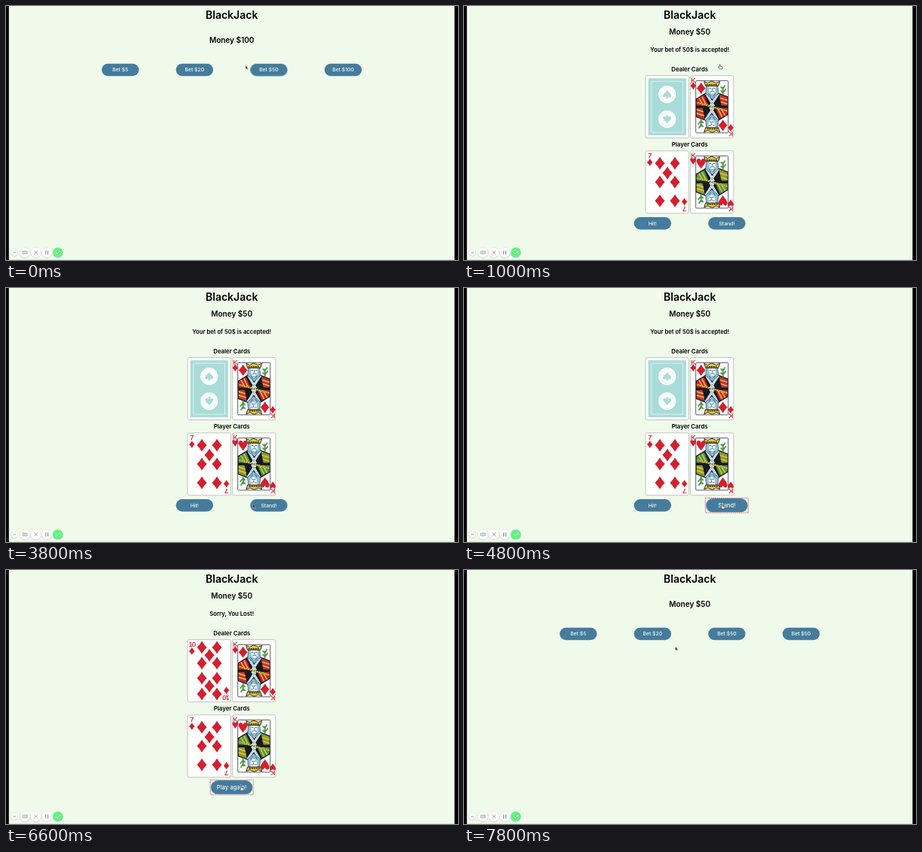
These frames come from a looping animation (600 by 338 pixels, 8 s). An HTML page:

```html
<!DOCTYPE html>
<html lang="en">
<head>
<meta charset="utf-8">
<title>BlackJack</title>
<style>
  html, body { margin: 0; width: 100%; height: 100%; overflow: hidden; background: #f0faeb; }
  svg { display: block; width: 100vw; height: 100vh; }
  text { font-family: Inter, "Open Sans", sans-serif; font-weight: 600; text-anchor: middle; }
  .rank { font: 9.4px "Liberation Sans", sans-serif; fill: #d3202f; stroke: #d3202f; stroke-width: .25; }
  .label { font-size: 6.8px; font-weight: 500; fill: #f0faeb; }

  /* A slight lead keeps every hard cut on the early side of its tick. */
  .anim { animation: 8s step-end -20ms infinite; }
  .start { animation-name: start; }
  .table { animation-name: table; }
  .play { animation-name: play; }
  .over { animation-name: over; }
  .end { animation-name: end; }
  .bar { animation-name: bar; }
  .cursor { animation-name: move; }
  .arrow { animation-name: arrow; }
  .hand { animation-name: hand; }
  .btn { transform-box: fill-box; transform-origin: center; }
  .ring { opacity: 0; }
  .bet50 { animation-name: bet50; }
  .bet50 .ring { animation-name: bet50ring; }
  .stand { animation-name: stand; }
  .stand .ring { animation-name: standring; }
  .again { animation-name: again; }
  .again .ring { animation-name: againring; }

  @keyframes start { 0% { opacity: 1 } 12.5%, 100% { opacity: 0 } }
  @keyframes table { 0%, 87.5%, 100% { opacity: 0 } 12.5% { opacity: 1 } }
  @keyframes play { 0%, 62.5%, 100% { opacity: 0 } 12.5% { opacity: 1 } }
  @keyframes over { 0%, 87.5%, 100% { opacity: 0 } 62.5% { opacity: 1 } }
  @keyframes end { 0%, 100% { opacity: 0 } 87.5% { opacity: 1 } }
  @keyframes bar { 0%, 77.5%, 100% { opacity: 1 } 62.5% { opacity: 0 } }
  @keyframes bet50 { 0%, 12.5%, 100% { transform: none } 5% { transform: scale(1.12) } }
  @keyframes bet50ring { 0%, 12.5%, 100% { opacity: 0 } 10% { opacity: 1 } }
  @keyframes stand { 0%, 62.5%, 100% { transform: none } 50% { transform: scale(1.12) } }
  @keyframes standring { 0%, 62.5%, 100% { opacity: 0 } 60% { opacity: 1 } }
  @keyframes again { 0%, 87.5%, 100% { transform: none } 80% { transform: scale(1.12) } }
  @keyframes againring { 0%, 87.5%, 100% { opacity: 0 } 82.5% { opacity: 1 } }
  @keyframes arrow {
    0%, 17.5%, 77.5%, 90%, 100% { opacity: 1 }
    5%, 50%, 80% { opacity: 0 }
  }
  @keyframes hand {
    0%, 17.5%, 62.5%, 90%, 100% { opacity: 0 }
    5%, 50%, 80% { opacity: 1 }
  }
  @keyframes move {
    0%, 100% { transform: translate(318px, 79px) }
    2.5% { transform: translate(321px, 80px) }
    5% { transform: translate(331px, 81px) }
    7.5% { transform: translate(338px, 79px) }
    10% { transform: translate(339px, 78px) }
    17.5% { transform: translate(338px, 96px) }
    20% { transform: translate(320px, 165px) }
    22.5% { transform: translate(292px, 248px) }
    25% { transform: translate(279px, 288px) }
    27.5% { transform: translate(280px, 288px) }
    47.5% { transform: translate(328px, 287.5px) }
    50% { transform: translate(337px, 288px) }
    52.5% { transform: translate(342px, 288px) }
    77.5% { transform: translate(338px, 291px) }
    80% { transform: translate(320px, 288px) }
    82.5% { transform: translate(311.5px, 287.5px) }
    90% { transform: translate(308px, 262px) }
    92.5% { transform: translate(294px, 170px) }
    95% { transform: translate(283px, 112px) }
    97.5% { transform: translate(280.5px, 102px) }
  }
</style>
</head>
<body>
<svg id="stage" viewBox="0 0 600 338" preserveAspectRatio="none">
  <defs>
    <path id="diamond" fill="#d3202f" d="M0-8.5Q2.6-3.8 6.6 0Q2.6 3.8 0 8.5Q-2.6 3.8-6.6 0Q-2.6-3.8 0-8.5z"/>
    <path id="heart" fill="#d3202f" d="M0 8C-2 3.5-6.6 1-6.6-3.6C-6.6-8.4-1-8.6 0-4C1-8.6 6.6-8.4 6.6-3.6C6.6 1 2 3.5 0 8z"/>
    <path id="spade" fill="#a9dcd8" d="M0-6.5C1-3.5 6-1.5 6 2C6 4.8 2.5 5 1 3L2 6H-2L-1 3C-2.5 5-6 4.8-6 2C-6-1.5-1-3.5 0-6.5z"/>
  </defs>
</svg>
<script>
  const text = (s, y, size, x = 299.7) => `<text x="${x}" y="${y}" font-size="${size}">${s}</text>`;
  const layer = (name, ...parts) => `<g class="anim ${name}">${parts.join('')}</g>`;
  const pip = (suit, x, y, k = 1) => `<use href="#${suit}" transform="translate(${x} ${y}) scale(${k})"/>`;
  const flip = (s, cx, cy) => s + `<g transform="rotate(180 ${cx} ${cy})">${s}</g>`;

  const button = (s, x, y, name = '') => `<g transform="translate(${x} ${y})"><g class="btn anim ${name}">
    <rect width="49.4" height="16.4" rx="8.2" fill="#457b9d"/>
    <rect class="ring anim" x="-.8" y="-.5" width="51" height="17.4" fill="none" stroke="#c2456b" stroke-width=".7" stroke-dasharray="1.5 .8"/>
    <text class="label" x="24.7" y="10.6">${s}</text></g></g>`;

  const card = (x, y, art) => `<g transform="translate(${x} ${y})">
    <rect width="57.3" height="83" rx="2.2" fill="#fff" stroke="#a9b0a8" stroke-width=".7"/>${art}</g>`;

  const corners = (rank, suit, x, y) => flip(
    `<text class="rank" x="${x}" y="8.9"${rank.length > 1 ? ' letter-spacing="-1"' : ''}>${rank}</text>` +
    pip(suit, x, y, .58), 28.7, 41.5);

  const number = (rank, spots) => corners(rank, 'diamond', 5.8, 15.3) +
    spots.map(([x, y]) => pip('diamond', x, y)).join('');

  const pairs = rows => rows.flatMap(y => [[19, y], [39, y]]);
  const seven = number('7', [...pairs([16.5, 41.5, 66.5]), [29, 29.5]]);
  const ten = number('10', [...pairs([10.5, 31.5, 51.5, 72.5]), [29, 21], [29, 62]]);

  const king = (suit, left, right) => {
    const half = `<path d="M0 35V24L13 16H30L43 21V35z" fill="#151a20"/>
      <path d="M1 33V25L11 19L17 33z" fill="${left}"/>
      <path d="M31 18L42 22V33H34z" fill="${right}"/>
      <path d="M4 23L10 33M8 21L14 33M32 23L42 26M33 28L42 31" stroke="#e3c93a" stroke-width="1.5"/>
      <path d="M14 17L24 34M30 17L19 34" stroke="#fff" stroke-width="3"/>
      <path d="M14 17L24 34M30 17L19 34" stroke="#3f8fb5" stroke-width="1.2" stroke-dasharray="1 1"/>
      <path d="M36 19V8M33 13L36 16L40 11M33 8L36 11L39 6" fill="none" stroke="#4f9548" stroke-width="1.8"/>
      <path d="M14 7H29L30 17Q26 20 22 25Q17 20 13 17z" fill="#8fc0d8" stroke="#182530" stroke-width=".6"/>
      <path d="M17 7H26V15Q22 20 18 15z" fill="#f5faf9"/>
      <path d="M18 10H20.5M23 10H25.5M22 10V13M19 15Q22 13 25 15M17 17L20 21M26 17L23 21" fill="none" stroke="#23455a" stroke-width=".8"/>
      <path d="M13 7L11 1L16 3L21 .5L27 3L32 1L30 7z" fill="#e3c93a" stroke="#151a20" stroke-width=".9"/>
      <path d="M14 5.3H29" stroke="#151a20" stroke-width="1.5" stroke-dasharray="2 1"/>
      ${pip(suit, 7, 10, .9)}`;
    return corners('K', suit, 3.8, 13.6) + `<g transform="translate(7.2 6.8)">
      <rect width="43" height="69.4" fill="#fff"/>${flip(half, 21.5, 34.7)}
      <path d="M1 29L42 40.4" stroke="#e3c93a" stroke-width="2"/>
      <path d="M1 29L42 40.4" stroke="#151a20" stroke-width="1" stroke-dasharray="1 2"/>
      <rect width="43" height="69.4" rx="1" fill="none" stroke="#30343a" stroke-width=".8"/></g>`;
  };

  const disc = `<circle cx="28.7" cy="25" r="11.6" fill="#fff"/>
    <circle cx="28.7" cy="25" r="9.8" fill="none" stroke="#d5eeeb" stroke-width=".6"/>${pip('spade', 28.7, 25, .9)}`;
  const back = `<rect x="3.6" y="3.6" width="50.2" height="75.8" fill="#a9dcd8"/>
    <rect x="7.8" y="7.6" width="41.8" height="67.8" fill="none" stroke="#e7f6f4" stroke-width=".8"/>
    ${flip(disc, 28.7, 41.5)}`;

  const bets = (money, top) => text(`Money $${money}`, 48.6, 10) + button('Bet $5', 127, 76.8) +
    button('Bet $20', 225.6, 76.8) + button('Bet $50', 324.2, 76.8, money === 100 ? 'bet50' : '') +
    button(`Bet $${top}`, 422.8, 76.8);

  const knob = (x, r, fill, icon) => `<g transform="translate(${x} 328)">
    <circle cy=".5" r="${r + .6}" fill="#bcc8bc" opacity=".6"/><circle r="${r}" fill="${fill}"/>
    <path d="${icon[0]}" fill="none" stroke="${icon[1]}" stroke-width="1"/></g>`;

  const dealerY = 92.6, playerY = 192.8, leftX = 241, rightX = 300.5;

  document.getElementById('stage').insertAdjacentHTML('beforeend', [
    '<rect width="600" height="338" fill="#f0faeb"/>',
    '<rect y="337" width="600" height="1" fill="#dde6da"/>',
    '<path d="M0 0H3.8V338H0zM595.4 0H600V338H595.4z"/>',
    text('BlackJack', 17, 14),
    layer('start', bets(100, 100)),
    layer('end', bets(50, 50)),
    layer('table',
      text('Money $50', 38, 10),
      text('Dealer Cards', 87.3, 7.8),
      text('Player Cards', 187.4, 7.8),
      card(rightX, dealerY, king('diamond', '#d3202f', '#c8323a')),
      card(leftX, playerY, seven),
      card(rightX, playerY, king('heart', '#4f9548', '#8f9b32'))),
    layer('play',
      text('Your bet of 50$ is accepted!', 61.2, 7.7),
      card(leftX, dealerY, back),
      button('Hit!', 225.6, 281),
      button('Stand!', 324.2, 281, 'stand')),
    layer('over',
      text('Sorry, You Lost!', 61.2, 7.7),
      card(leftX, dealerY, ten),
      button('Play again!', 274.9, 281, 'again')),
    layer('bar',
      knob(11.2, 4.4, '#fff', ['M-2 0H2', '#9aa0a6']),
      knob(25.2, 6.6, '#fff', ['M-3-1.8H3V1.8H-3zM-1-1V1M1-1V1', '#a4abb5']),
      knob(39.6, 6.6, '#fff', ['M-2.2-2.2L2.2 2.2M2.2-2.2L-2.2 2.2', '#d8818a']),
      knob(54.2, 6.6, '#fff', ['M-1.4-2.6V2.6M1.4-2.6V2.6', '#6f7a88']),
      knob(68.8, 6.6, '#62f283', ['M-2.6 .2L-.8 2L2.8-1.8', '#fff'])),
    layer('cursor',
      '<path class="anim arrow" d="M0 0V5L1.2 4L2 5.8L2.9 5.4L2.1 3.7H3.6z" fill="#111" stroke="#fff" stroke-width=".4"/>',
      '<path class="anim hand" d="M0 .3Q.7-.4 1.2 .4V2.2L3.8 2.8Q4.4 3 4.2 4L3.6 6H.6L-1.5 3.6Q-1.2 2.8 0 3.7z" fill="#fff" stroke="#222" stroke-width=".6"/>')
  ].join(''));
</script>
</body>
</html>
```
